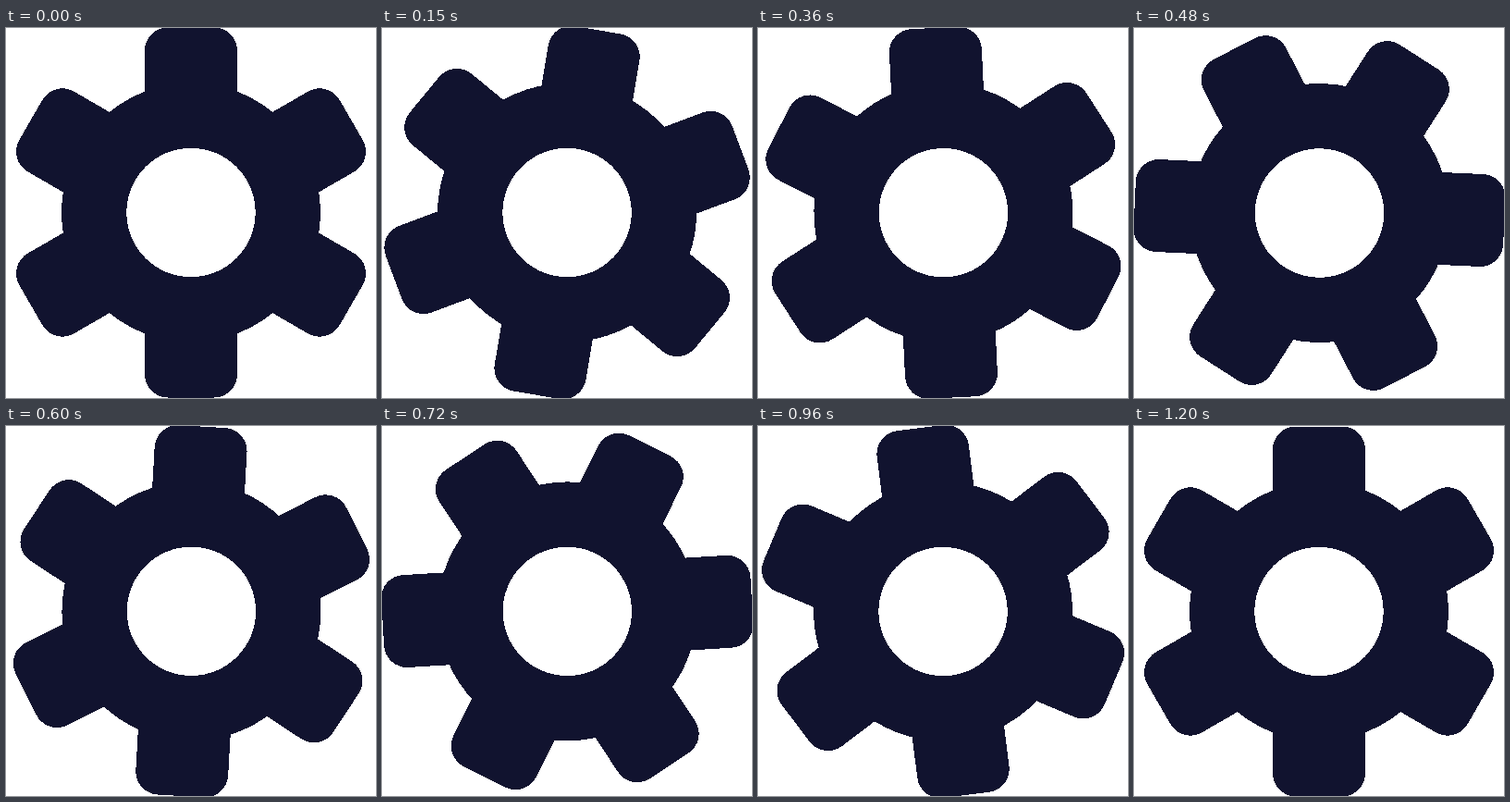
Write an HTML page that moves like this. It is 400 px wide and 400 px high and loops after 3.23 s.

```html
<!DOCTYPE html>
<html lang="en">
<head>
<meta charset="utf-8">
<title>Turning gear</title>
<style>
  html, body { margin: 0; width: 100%; height: 100%; overflow: hidden; background: #fff; }
  svg { display: block; width: 100%; height: 100%; }
</style>
</head>
<body>
<svg viewBox="0 0 400 400" shape-rendering="crispEdges">
  <defs>
    <rect id="bar" x="-50" y="-200" width="100" height="400" rx="25"/>
  </defs>
  <g id="gear" fill="#11132f">
    <!-- The gear sits slightly above its pivot -->
    <g transform="translate(0 -0.5)">
      <use href="#bar"/>
      <use href="#bar" transform="rotate(60)"/>
      <use href="#bar" transform="rotate(120)"/>
      <circle r="140"/>
      <circle r="69.7" fill="#fff"/>
    </g>
  </g>
</svg>
<script>
const LOOP = 3230, TURN = 1200, STEP = 30, SWEEP = 180;
const gear = document.getElementById('gear');

// One coordinate of a cubic Bezier running from 0 to 1
const bezier = (s, a, b) =>
  3 * (1 - s) * (1 - s) * s * a + 3 * (1 - s) * s * s * b + s * s * s;

function ease(x) {
  if (x <= 0) return 0;
  if (x >= 1) return 1;
  let lo = 0, hi = 1;
  for (let i = 0; i < 30; i++) {
    const mid = (lo + hi) / 2;
    if (bezier(mid, 0.333, 0.38) < x) lo = mid; else hi = mid;
  }
  return bezier(lo, 0, 1);
}

function draw(ms) {
  // The turn advances in 30 ms ticks, then rests until the loop ends
  const t = Math.floor((ms % LOOP) / STEP + 1e-6) * STEP;
  const angle = SWEEP * ease(t / TURN);
  gear.setAttribute('transform', `translate(200 200) rotate(${angle.toFixed(3)})`);
}

const start = performance.now();
function tick(now) {
  draw(Math.max(0, now - start));
  requestAnimationFrame(tick);
}
draw(0);
requestAnimationFrame(tick);
</script>
</body>
</html>
```
